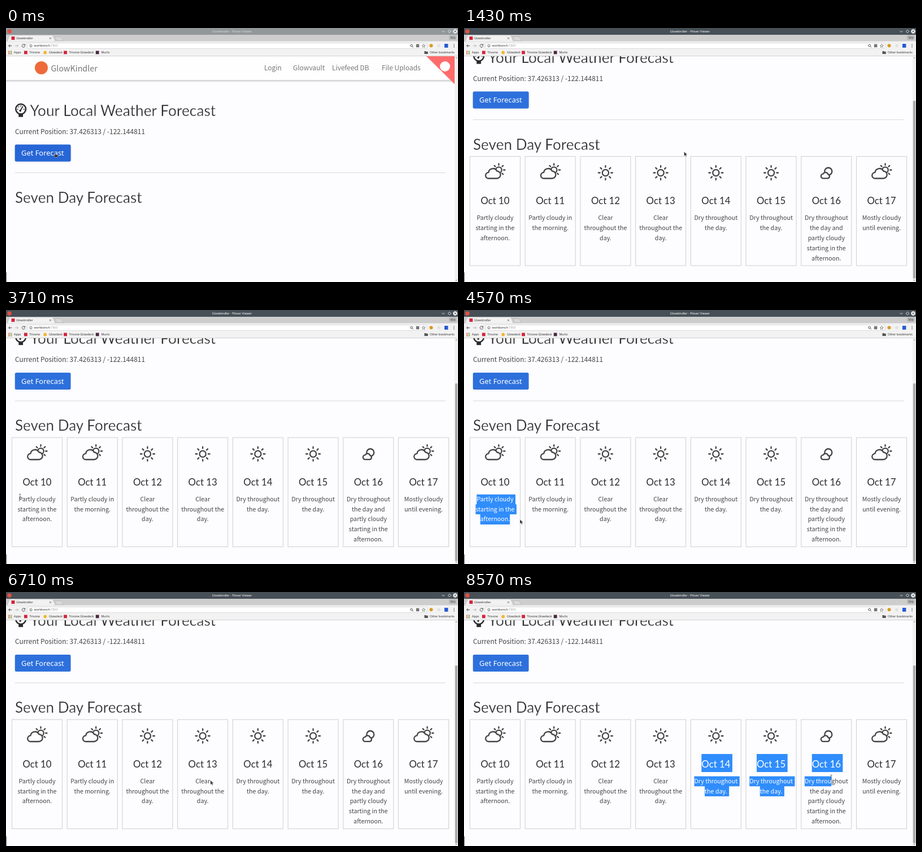
Animation of 800x450 px, one loop 8710 ms. Source, as an HTML page:

```html
<!DOCTYPE html>
<html lang="en">
<head>
<meta charset="utf-8">
<title>Weather forecast</title>
<style>
html, body { margin: 0; width: 100%; height: 100%; overflow: hidden; background: #fdfcfe; }
svg { display: block; width: 100vw; height: 100vh; cursor: default; user-select: none; }
text { white-space: pre; }
.body { font-family: "Noto Sans CJK JP", "Noto Sans CJK SC", "Noto Sans", sans-serif; }
.head { font-family: Lato, "Open Sans", sans-serif; }
.thin { stroke: #fdfcfe; stroke-width: .4; }
.ui { font-family: "Noto Sans", "Open Sans", sans-serif; }
.line { fill: none; stroke: #444; stroke-width: 2.3; stroke-linecap: round; stroke-linejoin: round; }
.cloud { fill: #fdfcfe; }
</style>
</head>
<body>
<svg id="stage" viewBox="0 0 800 450">
  <defs>
    <clipPath id="sel"></clipPath>
    <filter id="soft" x="-20%" y="-40%" width="140%" height="200%"><feGaussianBlur stdDeviation="1.6"/></filter>
    <linearGradient id="fade" x2="0" y2="1">
      <stop stop-color="#000" stop-opacity=".22"/><stop offset="1" stop-color="#000" stop-opacity="0"/>
    </linearGradient>
  </defs>
  <rect width="800" height="450" fill="#fdfcfe"/>
  <g id="page">
    <rect y="50" width="794" height="42.3" fill="#fefefe"/>
    <rect y="92.3" width="794" height="4" fill="url(#fade)"/>
    <circle cx="62.5" cy="70.5" r="11.5" fill="#ee6a3b"/>
    <path d="M744 50H794V99.5Z" fill="#ff6b6b"/>
    <circle cx="777" cy="68" r="9" fill="#fff"/>
    <g id="gauge" fill="none" stroke="#2b2b2d">
      <circle cx="26.2" cy="143.6" r="8.9" stroke-width="2.5"/>
      <path d="M25.4 146.2L29.6 139.2" stroke-width="1.8" stroke-linecap="round"/>
      <path d="M20.6 144h.1M22.3 139.8h.1M26.2 138h.1M31.8 144h.1" stroke-width="1.9" stroke-linecap="round"/>
      <path d="M22.3 152H30.1V157.6H22.3Z" fill="#2b2b2d" stroke="none"/>
      <circle cx="25.2" cy="146.6" r="1.8" fill="#2b2b2d" stroke="none"/>
    </g>
    <rect id="glow" x="16" y="207.5" width="98.5" height="29.5" rx="3" fill="#2c5fae" opacity=".3" filter="url(#soft)"/>
    <rect id="button" x="15.8" y="206.4" width="98.8" height="30" rx="2.5"/>
    <rect x="16" y="256" width="762" height="1" fill="#d8d7da"/>
    <g id="labels"></g>
    <g id="cards">
      <g id="boxes"></g>
      <g id="lines"></g>
      <g clip-path="url(#sel)">
        <rect y="300" width="800" height="300" fill="#308dfc"/>
        <g id="marked"></g>
      </g>
    </g>
  </g>
  <rect y="433" width="1" height="17" fill="#666"/>
  <g id="scrollbar">
    <rect x="794" y="50" width="6" height="400" fill="#f1f1f1"/>
    <path d="M795.6 53.6L797 51.8L798.4 53.6ZM795.6 446.2L797 448L798.4 446.2Z" fill="#777"/>
    <rect id="thumb" x="794.8" y="55" width="4.4" height="314.5" fill="#aaa"/>
  </g>
  <g id="browser">
    <rect id="title" width="800" height="12"/>
    <circle cx="6" cy="6" r="3.8" fill="#dd5144"/>
    <g fill="none" stroke="#e8eaeb" stroke-width=".9">
      <path d="M771.6 5L774 7.4L776.4 5M785 3.2L787.8 6L785 8.8L782.2 6Z"/>
      <circle cx="795" cy="6" r="3.4" fill="#e8eaeb"/>
      <path d="M793.7 4.7L796.3 7.3M796.3 4.7L793.7 7.3" stroke="#475057"/>
    </g>
    <rect y="12" width="800" height="12" fill="#cdcdcd"/>
    <path d="M86 15.5H97.5L102 22.5H90Z" fill="#d9d9d9" stroke="#b0b0b0" stroke-width=".6"/>
    <rect y="23.5" width="800" height="26.5" fill="#f2f2f2"/>
    <path d="M2 24L6.5 13H82.5L87.5 24Z" fill="#f2f2f2" stroke="#b5b5b5" stroke-width=".5"/>
    <rect y="23.9" x="3" width="83" height="1" fill="#f2f2f2"/>
    <rect x="9.5" y="15" width="6" height="6" fill="#d6243b"/>
    <path d="M77 16.7L80 19.7M80 16.7L77 19.7" stroke="#555" stroke-width=".8"/>
    <rect x="784.5" y="13.5" width="12" height="7" rx="1" fill="#bcbcbc" stroke="#a3a3a3" stroke-width=".5"/>
    <rect x="37.5" y="26.5" width="707.5" height="9.8" rx="1.2" fill="#fff" stroke="#c6c6c6" stroke-width=".6"/>
    <g fill="none" stroke="#555" stroke-width="1">
      <path d="M10.4 31.5H4.8M7.2 29L4.7 31.5L7.2 34"/>
      <path d="M16 31.5H21.6M19.2 29L21.7 31.5L19.2 34" stroke="#bbb"/>
      <path d="M33.2 29.9A2.7 2.7 0 1 0 33.6 32.2M33.7 28.4V30.6H31.5"/>
      <circle cx="44" cy="31.5" r="2.3" stroke-width=".7"/>
      <path d="M44 31V33M44 29.7V30.3" stroke-width=".8"/>
      <circle cx="717.6" cy="31" r="1.9"/>
      <path d="M719 32.5L721 34.4"/>
      <path d="M739.3 28.5L740.2 30.5L742.3 30.7L740.7 32.1L741.2 34.3L739.3 33.1L737.4 34.3L737.9 32.1L736.3 30.7L738.4 30.5Z" stroke-width=".7"/>
    </g>
    <rect x="725.8" y="28.6" width="5.6" height="5.6" fill="#767676"/>
    <circle cx="752.5" cy="31.3" r="3" fill="#d99a20"/>
    <circle cx="766" cy="31.3" r="2.8" fill="#e2e2e2"/>
    <rect x="776" y="28" width="6.4" height="6.8" fill="#2559d4"/>
    <path d="M793 28.4v1.4M793 30.8v1.4M793 33.2v1.4" stroke="#555" stroke-width="1.3"/>
    <g id="apps"></g>
    <rect x="32" y="40.5" width="5.8" height="5.8" fill="#d6243b"/>
    <circle cx="69.2" cy="43.4" r="2.9" fill="#f6b52c"/>
    <rect x="102.2" y="40.5" width="5.8" height="5.8" fill="#d6243b"/>
    <rect x="158.8" y="40.5" width="5.8" height="5.8" fill="#4a2740"/>
    <path d="M740.5 41H743L743.8 41.8H746.8V46H740.5Z" fill="#555"/>
    <rect y="49.3" width="800" height=".8" fill="#c9c9c9"/>
    <g id="chromeText"></g>
  </g>
  <g id="pointer">
    <path id="arrow" d="M0 0V8L1.9 6.3L3.2 9L4.5 8.4L3.3 5.7L5.7 5.5Z" fill="#333" stroke="#fff" stroke-width=".4"/>
    <path id="beam" d="M-1.8 -4Q0 -4 0 -3V3Q0 4 -1.8 4M1.8 -4Q0 -4 0 -3M0 3Q0 4 1.8 4" fill="none" stroke="#555" stroke-width=".8"/>
    <path id="hand" d="M-.7 0Q0 -.7 .7 0V2.4L4 3.2Q4.8 3.6 4.5 5L3.8 7.6H-.6L-2.6 4.6Q-2.4 3.5 -.7 4.6Z" fill="#333" stroke="#dde6f5" stroke-width=".4"/>
  </g>
</svg>
<script>
const LOOP = 8710, FPS = 7;
const CARD_X = 10.5, CARD_STEP = 97.72, CARD_W = 89;
const INK = "#2b2b2d", SOFT = "#444", PALE = "#777";
const $ = id => document.getElementById(id);

function add(parent, tag, attrs, content) {
  const el = document.createElementNS("http://www.w3.org/2000/svg", tag);
  for (const key in attrs) el.setAttribute(key, attrs[key]);
  if (content) el.textContent = content;
  return parent.appendChild(el);
}

function label(parent, cls, size, x, y, content, fill, extra) {
  return add(parent, "text", { class: cls, "font-size": size, x, y, fill, ...extra }, content);
}

// Page text
const page = $("labels");
label(page, "body", 14.3, 79.5, 77, "GlowKindler", PALE);
[[457, "Login"], [508, "Glowvault"], [577, "Livefeed DB"], [665, "File Uploads"]]
  .forEach(([x, s]) => label(page, "body", 11.95, x, 75.2, s, PALE));
label(page, "head thin", 26.3, 42.5, 155.6, "Your Local Weather Forecast", INK);
label(page, "body", 11.95, 16, 187.5, "Current Position: 37.426313 / -122.144811", SOFT);
label(page, "ui", 12.9, 27, 226, "Get Forecast", "#fff");
label(page, "head thin", 26.1, 16, 309.8, "Seven Day Forecast", INK);

// Browser text
const chrome = $("chromeText");
const caption = label(chrome, "ui", 5.5, 400, 8, "Glowkindler - Plover Viewer", "#fff", { "text-anchor": "middle" });
label(chrome, "ui", 5.3, 18, 20, "Glowkindler", "#333");
label(chrome, "ui", 4.8, 786.5, 18.8, "Nilo", SOFT);
const address = label(chrome, "ui", 5.4, 49.5, 33.3, "workbench", "#333");
add(address, "tspan", { fill: "#999" }, ":7300");
[[14, "Apps"], [41.5, "Trivone"], [76, "Glowdeck"], [111.5, "Trivone Glowdeck"], [168.5, "Murlo"], [750, "Other bookmarks"]]
  .forEach(([x, s]) => label(chrome, "ui", 5.3, x, 45.3, s, "#333"));
for (let i = 0; i < 9; i++) {
  add($("apps"), "rect", {
    x: 4.3 + i % 3 * 2.2, y: 40.6 + Math.floor(i / 3) * 2.2, width: 1.6, height: 1.6,
    fill: ["#d9534a", "#e5a62f", "#4a9b62"][i % 3]
  });
}

// Forecast cards
const rays = (from, to, list) => list.map(k => {
  const c = Math.cos(k * Math.PI / 4), s = Math.sin(k * Math.PI / 4);
  return `M${c * from} ${s * from}L${c * to} ${s * to}`;
}).join("");
const ICONS = {
  sun: `<circle r="5.6"/><path d="${rays(9.8, 12.5, [0, 1, 2, 3, 4, 5, 6, 7])}"/>`,
  partly: `<g transform="translate(7.5 -5)"><circle r="5.2"/><path d="${rays(8.6, 11, [0, 1, 5, 6, 7])}"/></g>
    <path class="cloud" d="M-10.5 10A5.3 5.3 0 0 1 -10.5 -.6A7.8 7.8 0 0 1 4.3 -3A6.5 6.5 0 0 1 4 10Z"/>`,
  night: `<circle cx="3.5" cy="-2.5" r="6.5"/>
    <path class="cloud" d="M-5.5 9.8A4 4 0 0 1 -5.5 1.8A4.6 4.6 0 0 1 3 2.6A3.7 3.7 0 0 1 2.5 9.8Z"/>`
};
const clear = "Clear|throughout the|day.", dry = "Dry throughout|the day.";
const DAYS = [
  ["partly", "Partly cloudy|starting in the|afternoon."],
  ["partly", "Partly cloudy in|the morning."],
  ["sun", clear], ["sun", clear], ["sun", dry], ["sun", dry],
  ["night", "Dry throughout|the day and|partly cloudy|starting in the|afternoon."],
  ["partly", "Mostly cloudy|until evening."]
];
const lines = [];

function addLine(card, cls, size, y, h, baseline, content, fill) {
  const mid = CARD_X + card * CARD_STEP + CARD_W / 2;
  const el = label($("lines"), cls, size, mid, baseline, content, fill, { "text-anchor": "middle" });
  const w = el.getComputedTextLength(), end = mid + w / 2;
  const stops = [...content].map((_, i) => el.getStartPositionOfChar(i).x).concat(end);
  lines.push({ card, y, h, x: mid - w / 2, end, stops });
  $("marked").appendChild(el.cloneNode(true)).setAttribute("fill", "#fff");
}

DAYS.forEach(([icon, text], card) => {
  const x = CARD_X + card * CARD_STEP, mid = x + CARD_W / 2;
  add($("boxes"), "rect", { x, y: 321.5, width: CARD_W, height: 193.5, fill: "none", stroke: "#cfced1" });
  add($("boxes"), "g", { class: "line", transform: `translate(${mid - (icon == "partly" ? 1 : 0)} 350.5)` }).innerHTML = ICONS[icon];
  addLine(card, "head", 16.8, 382.5, 32, 406, "Oct " + (10 + card), INK);
  text.split("|").forEach((s, i) =>
    addLine(card, "body", 10.7, 422 + i * 17.8, 17.8, 434.3 + i * 17.8, s, SOFT));
});

// Pointer path: step, x, y
const PATH = [
  [0, 87, 221.5], [3, 87, 221.5], [5, 190, 212], [8, 357.5, 182], [10, 389.5, 219], [13, 389.5, 219],
  [16, 337, 290], [20, 120, 312], [24, 26, 327], [26, 24.8, 330], [28, 58, 338], [30, 82, 356],
  [31, 90, 371], [33, 108, 371], [36, 310, 330], [39, 567.5, 245.5], [40, 566, 252], [44, 460, 318],
  [47, 361.8, 333.5], [48, 362, 334], [50, 382, 374], [51, 425, 350], [53, 620, 345], [55, 766, 305],
  [56, 610, 335], [57, 420, 350], [58, 308, 352], [59, 520, 348], [60, 650, 328]
];
const DRAGS = [{ press: 26, release: 32, clear: 40 }, { press: 50, release: 61, clear: 61 }];

function pointerAt(step) {
  const i = PATH.findIndex(p => p[0] >= step), b = PATH[i], a = PATH[i - 1] || b;
  const k = a === b ? 0 : (step - a[0]) / (b[0] - a[0]);
  return [a[1] + (b[1] - a[1]) * k, a[2] + (b[2] - a[2]) * k];
}

const scrollAt = step => step < 9 ? 0 : step < 10 ? 58 : step < 11 ? 94 : 95.5;

// Text position nearest to the pointer
function caretAt(step) {
  const [x, y] = pointerAt(step), py = y + scrollAt(step);
  const card = Math.max(0, Math.min(7, Math.floor((x - 6) / CARD_STEP)));
  let i = lines.findIndex(l => l.card === card);
  while (lines[i + 1] && lines[i + 1].card === card && lines[i + 1].y <= py) i++;
  const near = (p, q) => Math.abs(q - x) < Math.abs(p - x) ? q : p;
  return { i, x: lines[i].stops.reduce(near) };
}

function selectionAt(step) {
  const drag = DRAGS.find(d => step >= d.press && step < d.clear);
  if (!drag) return "";
  const [a, b] = [caretAt(drag.press), caretAt(Math.min(step, drag.release))]
    .sort((p, q) => p.i - q.i || p.x - q.x);
  return lines.map((l, i) => {
    if (i < a.i || i > b.i) return "";
    const x0 = i === a.i ? a.x : l.x, x1 = i === b.i ? b.x : l.end + 3.5;
    if (x0 >= l.end || x1 <= x0) return "";
    return `<rect x="${x0}" y="${l.y}" width="${x1 - x0}" height="${l.h}"/>`;
  }).join("");
}

const show = (id, on) => $(id).setAttribute("visibility", on ? "visible" : "hidden");

function draw(step) {
  const [x, y] = pointerAt(step), scroll = scrollAt(step), py = y + scroll;
  const hover = x > 16 && x < 114.5 && py > 206 && py < 236;
  const dragging = DRAGS.some(d => step > d.press && step < d.release);
  const ready = step >= 5, focused = step >= 2;
  const onText = ready && lines.some(l => x >= l.x && x <= l.end && py >= l.y && py <= l.y + l.h);
  const beam = dragging || onText;

  $("page").setAttribute("transform", `translate(0 ${-scroll})`);
  $("thumb").setAttribute("y", 55.3 + scroll * .785);
  $("button").setAttribute("fill", hover ? "#2766d6" : "#2d70dc");
  $("title").setAttribute("fill", focused ? "#475057" : "#92979a");
  caption.setAttribute("fill", focused ? "#fff" : "#d5d8d9");
  $("sel").innerHTML = selectionAt(step);
  show("glow", step < 26);
  show("cards", ready);
  show("thumb", ready);
  $("pointer").setAttribute("transform", `translate(${x} ${y})`);
  show("hand", hover);
  show("beam", beam && !hover);
  show("arrow", !beam && !hover);
}

let last = -1;
function tick() {
  const t = performance.now() % LOOP;
  const step = Math.min(60, Math.floor((t + 5) * FPS / 1000));
  if (step !== last) draw(last = step);
  requestAnimationFrame(tick);
}
tick();
</script>
</body>
</html>
```
